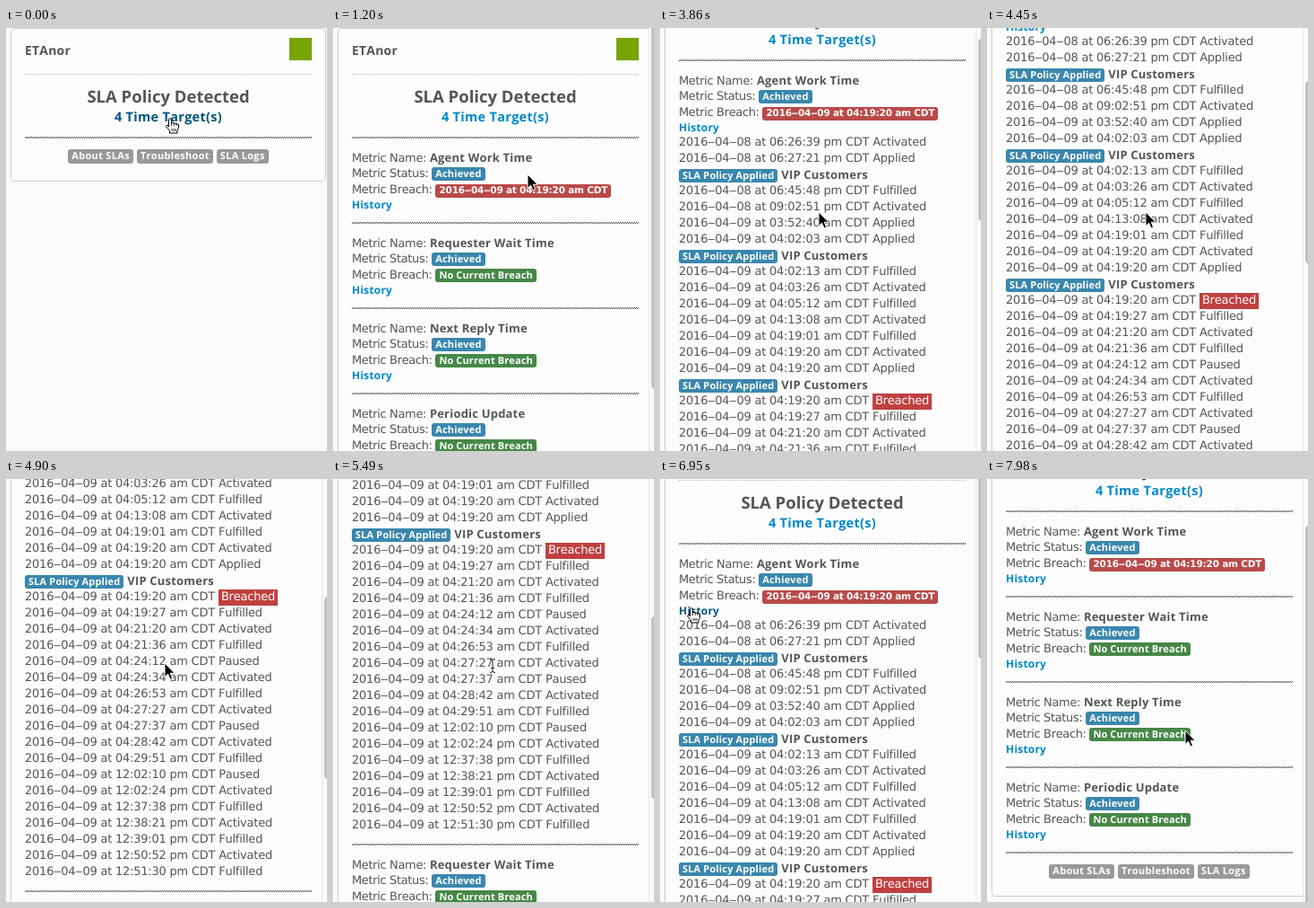
An HTML page that plays this animation: 358x471 px, repeating every 8 s.

```html
<!DOCTYPE html>
<html lang="en">
<head>
<meta charset="utf-8">
<title>SLA policy panel</title>
<style>
html, body { margin: 0; width: 100%; height: 100%; overflow: hidden; background: #fafafa; }
body {
  position: relative; color: #555;
  font: 13px/18px "DejaVu Sans", sans-serif;
  font-kerning: none; text-rendering: geometricPrecision;
}
#card {
  position: absolute; left: 5px; top: 0; width: 352px; padding: 120px 15px 19px;
  box-sizing: border-box; border: 1px solid #ccc; border-radius: 5px; background: #fdfdfd;
}
b, .link, .tag, h1, h2 { font-family: "Open Sans", sans-serif; font-weight: 700; letter-spacing: .2px; }
h1, h2, #targets, #icon, #rule { position: absolute; margin: 0; }
h1 { left: 15px; top: 16px; font-size: 14px; line-height: 18px; }
h2 { left: 0; right: 0; top: 65px; font-size: 18.5px; line-height: 22px; letter-spacing: 0; text-align: center; }
#icon { left: 310px; top: 10px; width: 25px; height: 25px; background: #78a300; }
#rule { left: 15px; right: 15px; top: 50px; border-top: 1px dotted #bbb; }
#targets { left: 0; right: 0; top: 90px; font-size: 14.5px; letter-spacing: .3px; text-align: center; }
.link { color: #08c; }
.link.hover { color: #005580; }
hr {
  margin: 0; height: 2px; border: 0;
  background: repeating-conic-gradient(#444 0 25%, transparent 0 50%) 0 0 / 2px 2px;
}
#body { white-space: pre; }
.metric { padding: 12px 0; letter-spacing: -.35px; }
.metric > div, .log > div { height: 18px; }
.metric > .name { height: 19px; line-height: 19px; }
.metric > .link { height: 14px; font-size: 12px; line-height: 14px; letter-spacing: .2px; }
.metric > .log { position: relative; top: 1px; height: auto; letter-spacing: -.22px; }
.log b, .log .tag { position: relative; top: -1px; }
.tag {
  display: inline-block; height: 15px; padding: 0 4px; border-radius: 3px;
  color: #fff; font-size: 11px; line-height: 15px;
}
.info { background: #3a87ad; letter-spacing: .15px; }
.ok { background: #468847; letter-spacing: .1px; }
.late { background: #b94a48; font: 700 10.5px/15px "DejaVu Sans", sans-serif; letter-spacing: -.2px; }
.breach { display: inline-block; height: 18px; padding: 0 3px; background: #c04040; color: #fff; }
#buttons { display: flex; justify-content: center; gap: 4px; padding-top: 12px; }
#buttons .tag { height: 16px; line-height: 16px; background: #999; letter-spacing: .3px; }
#track {
  position: absolute; left: 352px; top: 0; bottom: 0; width: 6px; box-sizing: border-box;
  overflow: hidden; background: #fafafa; border-left: 1px solid #e7e7e7;
}
#thumb { position: absolute; left: 2px; width: 8px; border-radius: 4px; background: #c1c1c1; }
#pointer { position: absolute; left: 0; top: 0; overflow: visible; }
</style>
</head>
<body>
<div id="card">
  <h1>ETAnor</h1><div id="icon"></div><div id="rule"></div>
  <h2>SLA Policy Detected</h2>
  <div id="targets" class="link">4 Time Target(s)</div>
  <div id="body"></div>
</div>
<div id="track"><div id="thumb"></div></div>
<svg id="pointer" width="1" height="1" stroke-linejoin="round">
  <path id="arrow" d="M0 0V15.5L3.6 12.2 6 18 8.6 16.9 6.2 11.2H11.2Z" fill="#000" stroke="#fff"/>
  <g id="hand" stroke="#000" fill="#fff">
    <path d="M-2.5 10V1.7Q-1 -.6 .5 1.7V5.5L3.3 5.8 6 6.5 8.5 7.5V11L7 14V17H-1.5V14.5L-5.5 9.5 -4 8Z"/>
    <path d="M.5 5.5V9M3.3 6V9M6 6.5V9M1 12V15M3 12V15M5 12V15" stroke-width=".8"/>
  </g>
  <path id="beam" d="M-3 -7.5Q0 -7.5 0 -6Q0 -7.5 3 -7.5M0 -6V6M-3 7.5Q0 7.5 0 6Q0 7.5 3 7.5M-2 2.5H2" fill="none" stroke="#222"/>
</svg>
<script>
const $ = id => document.getElementById(id);
const div = (cls, html) => `<div class="${cls}">${html}</div>`;
const tag = (cls, text) => `<span class="tag ${cls}">${text}</span>`;
const stamp = (day, time, half) => `2016‒04‒${day} at ${time} ${half} CDT`;

const events = `08 06:26:39 pm Activated
08 06:27:21 pm Applied
08 06:45:48 pm Fulfilled
08 09:02:51 pm Activated
09 03:52:40 am Applied
09 04:02:03 am Applied
09 04:02:13 am Fulfilled
09 04:03:26 am Activated
09 04:05:12 am Fulfilled
09 04:13:08 am Activated
09 04:19:01 am Fulfilled
09 04:19:20 am Activated
09 04:19:20 am Applied
09 04:19:20 am Breached
09 04:19:27 am Fulfilled
09 04:21:20 am Activated
09 04:21:36 am Fulfilled
09 04:24:12 am Paused
09 04:24:34 am Activated
09 04:26:53 am Fulfilled
09 04:27:27 am Activated
09 04:27:37 am Paused
09 04:28:42 am Activated
09 04:29:51 am Fulfilled
09 12:02:10 pm Paused
09 12:02:24 pm Activated
09 12:37:38 pm Fulfilled
09 12:38:21 pm Activated
09 12:39:01 pm Fulfilled
09 12:50:52 pm Activated
09 12:51:30 pm Fulfilled`.split("\n");
const policyAfter = [1, 5, 12];

const log = events.map((line, i) => {
  const [day, time, half, what] = line.split(" ");
  const label = what === "Breached" ? `<span class="breach">${what}</span>` : what;
  const policy = policyAfter.includes(i) ? div("", tag("info", "SLA Policy Applied") + " <b>VIP Customers</b>") : "";
  return div("", `${stamp(day, time, half)} ${label}`) + policy;
}).join("");

const metric = (name, i) => "<hr>" + div("metric",
  div("name", `Metric Name: <b>${name}</b>`) +
  div("", "Metric Status: " + tag("info", "Achieved")) +
  div("", "Metric Breach: " + (i ? tag("ok", "No Current Breach") : tag("late", stamp("09", "04:19:20", "am")))) +
  div("link", "History") + (i ? "" : div("log", log)));

$("body").innerHTML =
  `<div id="metrics">${["Agent Work Time", "Requester Wait Time", "Next Reply Time", "Periodic Update"].map(metric).join("")}</div><hr>` +
  `<div id="buttons">${["About SLAs", "Troubleshoot", "SLA Logs"].map(t => tag("", t)).join("")}</div>`;
const historyLink = document.querySelector(".metric > .link");
const logBox = document.querySelector(".log");

// tick, scroll, pointer x, pointer y
const keys = [
  [4, 0, 184, 100], [7, 0, 233, 194], [10, 86, 233, 194], [13, 86, 233, 194],
  [18, 86, 36, 107], [21, 86, 36, 107], [24, 86, 177, 205], [28, 198, 177, 205],
  [31, 370, 177, 205], [32, 370, 178, 208], [35, 422, 178, 208], [39, 77, 178, 208],
  [41, 50, 178, 208], [45, 50, 36, 143], [47, 50, 36, 143], [49, 86, 100, 190], [52, 86, 221, 280]
];

function poseAt(n) {
  const i = keys.findIndex(k => k[0] >= n);
  if (i < 1) return keys[i ? keys.length - 1 : 0].slice(1);
  const [a, b] = [keys[i - 1], keys[i]];
  const f = (n - a[0]) / (b[0] - a[0]);
  return a.slice(1).map((v, j) => Math.round(v + (b[j + 1] - v) * f));
}

const show = (el, on) => el.style.display = on ? "" : "none";

function draw() {
  // the picture advances in steps of about 148 ms after a first pause
  const n = Math.floor((performance.now() % 8000 - 300) / 147.6);
  const [scroll, x, y] = poseAt(n);
  const open = n >= 0, logOpen = n >= 20 && n < 47;
  const onTargets = n < 5, onHistory = n >= 18 && n < 22 || n >= 45 && n < 48;
  const kind = onTargets || onHistory ? "hand" : n >= 33 && n < 45 ? "beam" : "arrow";

  show($("metrics"), open);
  show(logBox, logOpen);
  show($("track"), open);
  $("targets").classList.toggle("hover", onTargets);
  historyLink.classList.toggle("hover", onHistory);
  $("card").style.top = -scroll + "px";

  const ratio = 491 / (logOpen ? 1169 : 557);
  $("thumb").style.top = Math.round(ratio * scroll - 24) + "px";
  $("thumb").style.height = Math.round(ratio * 483) + "px";

  for (const id of ["arrow", "hand", "beam"]) show($(id), id === kind);
  $("pointer").style.transform = `translate(${x}px,${y}px)`;
  requestAnimationFrame(draw);
}
draw();
</script>
</body>
</html>
```
